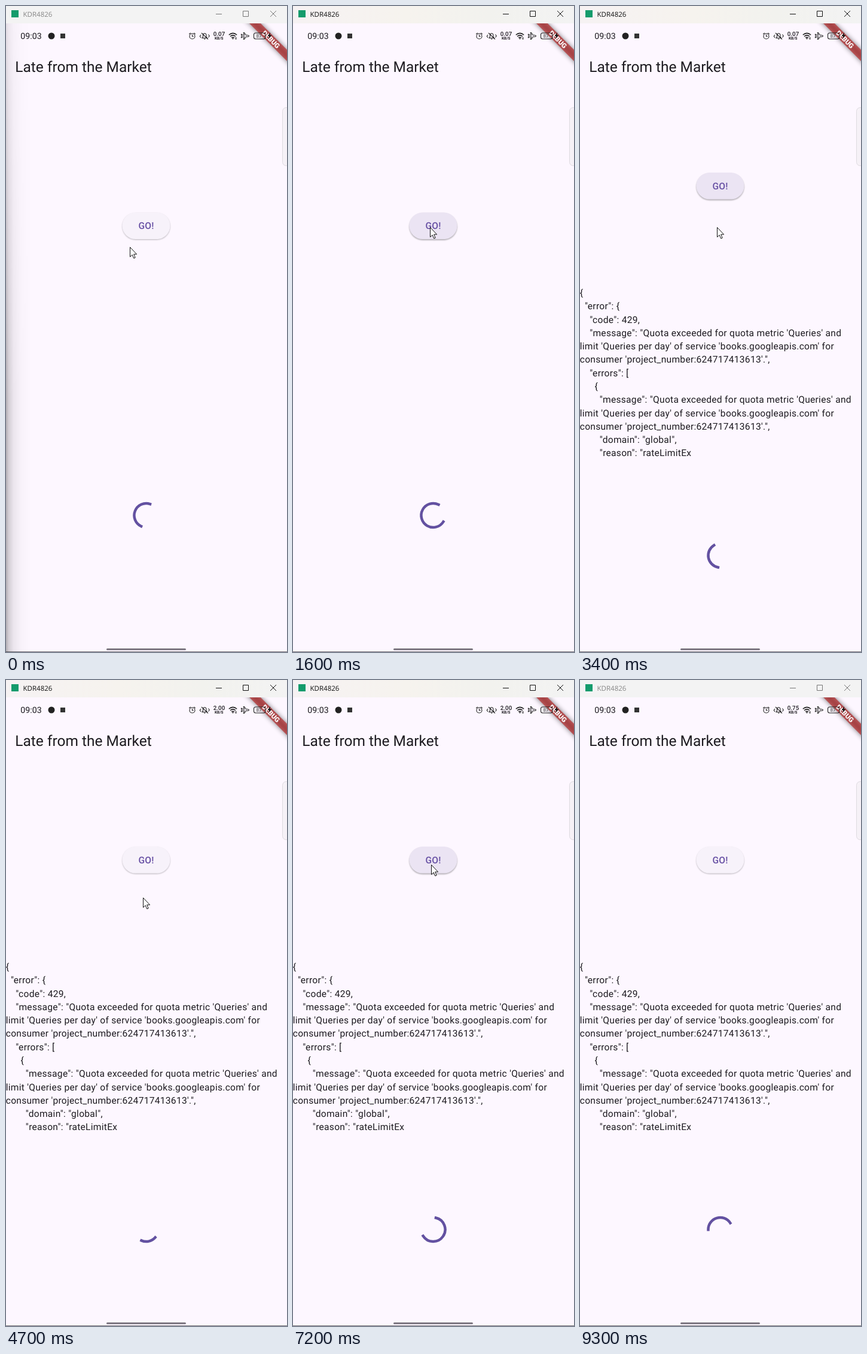
An HTML page for the animation above (9.4 s loop, 470 px wide and 1078 px high).

```html
<!DOCTYPE html>
<html lang="en">
<head>
<meta charset="utf-8">
<title>Async demo</title>
<style>
  html, body { margin: 0; width: 100%; height: 100%; overflow: hidden; background: #fdf7ff; }
  svg { display: block; width: 100%; height: 100%; }
  text { font-family: Roboto, sans-serif; fill: #1d1b20; white-space: pre; text-rendering: geometricPrecision; }
  .line { fill: none; stroke: #222; stroke-width: 1.1; }
  .mid { text-anchor: middle; }
  #response text { font-size: 15.58px; letter-spacing: .28px; }
</style>
</head>
<body>
<svg viewBox="0 0 470 1078">
  <defs>
    <linearGradient id="activeBar">
      <stop offset="0" stop-color="#f6f2f3"/>
      <stop offset=".4" stop-color="#f6f3ee"/>
      <stop offset=".7" stop-color="#f2f2ee"/>
      <stop offset="1" stop-color="#f3f3f3"/>
    </linearGradient>
    <linearGradient id="edgeShade">
      <stop offset="0" stop-opacity=".3"/>
      <stop offset=".1" stop-opacity=".17"/>
      <stop offset=".3" stop-opacity=".07"/>
      <stop offset=".6" stop-opacity=".02"/>
      <stop offset="1" stop-opacity="0"/>
    </linearGradient>
    <linearGradient id="downward" x2="0" y2="1">
      <stop offset="0" stop-color="#fff" stop-opacity=".35"/>
      <stop offset=".6" stop-color="#fff"/>
    </linearGradient>
    <mask id="shadeMask"><rect y="28" width="42" height="1050" fill="url(#downward)"/></mask>
    <filter id="bannerBlur" x="-20%" y="-200%" width="140%" height="500%"><feGaussianBlur stdDeviation="4"/></filter>
    <filter id="buttonBlur" x="-20%" y="-30%" width="140%" height="160%"><feGaussianBlur stdDeviation="1.2"/></filter>
  </defs>

  <rect width="470" height="1078" fill="#fdf7ff"/>
  <text x="15.3" y="110" font-size="24.5">Late from the Market</text>
  <rect x="462.5" y="169.5" width="20" height="97" rx="6" fill="#f6f1f7" stroke="#dedae0"/>

  <g id="button">
    <rect id="buttonShadow" x="194.5" y="-22.2" width="80" height="44.5" rx="22.25" filter="url(#buttonBlur)"/>
    <rect id="buttonFace" x="194.5" y="-22.2" width="80" height="44.5" rx="22.25"/>
    <text class="mid" x="234.5" y="5.5" font-size="15.58" font-weight="500" letter-spacing=".11" style="fill:#6750a4">GO!</text>
  </g>
  <g id="response"></g>
  <path id="spinner" fill="none" stroke="#6351a1" stroke-width="4.45" stroke-linecap="square"/>

  <g transform="translate(470 29) rotate(45)">
    <rect x="-70" y="31.2" width="140" height="13.3" fill="#000" opacity=".5" filter="url(#bannerBlur)"/>
    <rect x="-70" y="31.2" width="140" height="13.3" fill="#b71c1c" opacity=".63"/>
    <text class="mid" y="41.9" font-size="11.35" font-weight="900" style="fill:#fff">DEBUG</text>
  </g>

  <!-- status bar -->
  <text x="24.3" y="55" font-size="14.2">09:03</text>
  <circle cx="76" cy="50" r="5.5" fill="#222"/>
  <rect x="91" y="46" width="8" height="8" fill="#333"/>
  <g class="line">
    <circle cx="311.5" cy="50.5" r="4.5"/>
    <path d="M311.5 47.8V50.8H313.8M306.3 47L308.8 44.8M316.7 47L314.2 44.8"/>
    <path d="M328 53.5H336.5L335 51.5V49C335 44.6 329.5 44.6 329.5 49V51.5ZM331 55.3H333.5M327 45L338 55.5M326 48L324.3 50.5 326 53M338.5 47.5L340.3 50 338.5 52.5"/>
    <path d="M372.8 48.3Q379.5 42.5 386.2 48.3M375 50.8Q379.5 47 384 50.8M377.2 53.1Q379.5 51.3 381.8 53.1" stroke-width="1.5"/>
    <path d="M406.5 50Q406 48.8 404 48.8H401.5L398.6 44.5H397.3L398.6 48.8H396L394.5 47.2H393.4L394.3 50 393.4 52.8H394.5L396 51.2H398.6L397.3 55.5H398.6L401.5 51.2H404Q406 51.2 406.5 50Z"/>
    <rect x="414.5" y="45" width="19.5" height="10" rx="3"/>
  </g>
  <circle cx="379.5" cy="54.4" r="1.1" fill="#222"/>
  <path d="M383 53H386M383 55H386" stroke="#222"/>
  <text id="rate" class="mid" x="356.5" y="50.2" font-size="9.8" font-weight="500"></text>
  <text class="mid" x="356.3" y="56" font-size="6.4" font-weight="700">KB/S</text>
  <text class="mid" x="423" y="53" font-size="8" style="fill:#444">87</text>
  <path d="M442 44L437.5 50.3H440.5L439.2 55L444.5 48.6H441.3Z" fill="#111"/>

  <rect x="168" y="1072" width="133" height="3" rx="1.5" fill="#7f7983"/>
  <rect y="1077" width="470" height="1" fill="#77737a"/>
  <rect id="shade" y="28" width="42" height="1050" fill="url(#edgeShade)" mask="url(#shadeMask)"/>

  <!-- window title bar -->
  <rect id="bar" width="470" height="29"/>
  <rect x="9" y="7" width="12" height="12" fill="#149b6c"/>
  <text id="device" x="28.5" y="18" font-size="11.5" style="font-family:'Open Sans',sans-serif">KDR4826</text>
  <path id="controls" fill="none" d="M351 13.5H361M396.5 8.5H405.5V17.5H396.5ZM442 8L452 18M452 8L442 18"/>

  <path id="cursor" d="M.5.5V16.6L4.2 13.2 6.8 19 9.2 18 6.7 12.2H11.6Z" fill="#fff" stroke="#111"/>
</svg>
<script>
const LOOP = 9400, STEP = 100;
const RESPONSE_AT = 3290;
const $ = id => document.getElementById(id);
const set = (id, attrs) => { for (const k in attrs) $(id).setAttribute(k, attrs[k]); };
const clamp = x => Math.min(1, Math.max(0, x));
const mix = (a, b, k) => a + (b - a) * k;
const ramp = (t, start, length) => clamp((t - start) / length);

const quota = [
  `"message": "Quota exceeded for quota metric 'Queries' and`,
  `limit 'Queries per day' of service 'books.googleapis.com' for`,
  `consumer 'project_number:624717413613'.",`
];
const lines = [
  '{', '  "error": {', '    "code": 429,',
  '    ' + quota[0], quota[1], quota[2],
  '    "errors": [', '      {',
  '        ' + quota[0], quota[1], quota[2],
  '        "domain": "global",', '        "reason": "rateLimitEx'
];
lines.forEach((line, i) => {
  const text = document.createElementNS('http://www.w3.org/2000/svg', 'text');
  text.setAttribute('x', -0.3);
  text.setAttribute('y', 484 + i * 22.28);
  text.textContent = line;
  $('response').append(text);
});

// Pointer stops: time, x, y
const stops = [
  [0, 207, 402], [800, 207, 402], [1300, 229, 369], [4000, 229, 369],
  [4300, 229, 363], [5200, 229, 363], [5600, 231, 323], [6000, 231, 323],
  [6300, 231, 308], [8200, 231, 308], [8600, 485, 290], [LOOP, 485, 290]
];
function pointerAt(t) {
  const i = stops.findIndex(s => s[0] > t);
  const [t0, x0, y0] = stops[i - 1], [t1, x1, y1] = stops[i];
  const u = (t - t0) / (t1 - t0), k = u * u * (3 - 2 * u);
  return [mix(x0, x1, k), mix(y0, y1, k)];
}

// Material easing: cubic-bezier(.4, 0, .2, 1)
function fastOutSlowIn(x) {
  let lo = 0, hi = 1;
  for (let i = 0; i < 20; i++) {
    const s = (lo + hi) / 2, r = 1 - s;
    if (1.2 * r * r * s + 0.6 * r * s * s + s ** 3 < x) lo = s; else hi = s;
  }
  return lo * lo * (3 - 2 * lo);
}

function spinnerPath(t, cx, cy) {
  const radius = 20.03;
  const phase = (0.208 + t / 1333) % 1, turn = 0.517 + t / 2222;
  const head = fastOutSlowIn(clamp(phase * 2)), tail = fastOutSlowIn(clamp(phase * 2 - 1));
  const start = Math.PI * (-0.5 + 1.5 * tail + 2 * turn + 0.5 * phase);
  const sweep = Math.max(1.5 * Math.PI * (head - tail), 0.001);
  const point = a => `${cx + radius * Math.cos(a)} ${cy + radius * Math.sin(a)}`;
  return `M${point(start)}A${radius} ${radius} 0 ${+(sweep > Math.PI)} 1 ${point(start + sweep)}`;
}

function render(t) {
  const loaded = t >= RESPONSE_AT;
  const focused = t >= 1400 && t < 9200;
  const hover = ramp(t, 1100, 200) - ramp(t, 3420, 200) + ramp(t, 6050, 200) - ramp(t, 8200, 200);
  const tint = [[247, 235], [242, 228], [250, 243]].map(([a, b]) => Math.round(mix(a, b, hover)));

  set('response', { visibility: loaded ? 'visible' : 'hidden' });
  set('button', { transform: `translate(0 ${loaded ? 300.3 : 366.8})` });
  set('buttonFace', { fill: `rgb(${tint})` });
  set('buttonShadow', { transform: `translate(0 ${mix(1.1, 1.7, hover)})`, opacity: mix(0.24, 0.3, hover) });

  // The interface stalls briefly while the response is laid out.
  const spinTime = t > 3285 && t <= 3400 ? 3285 : t;
  set('spinner', { d: spinnerPath(spinTime, 234.5, loaded ? 917 : 850) });

  $('rate').textContent = t < 3600 ? '0.07' : t < 7600 ? '2.00' : '0.75';
  set('shade', { visibility: t < 1400 ? 'visible' : 'hidden' });
  set('bar', { fill: focused ? 'url(#activeBar)' : '#f3f3f3' });
  $('device').style.fill = focused ? '#111' : '#868686';
  set('controls', { stroke: focused ? '#111' : '#777' });
  set('cursor', { transform: `translate(${pointerAt(t)})` });
}

function tick() {
  render(Math.floor(performance.now() % LOOP / STEP) * STEP);
  requestAnimationFrame(tick);
}
tick();
</script>
</body>
</html>
```
